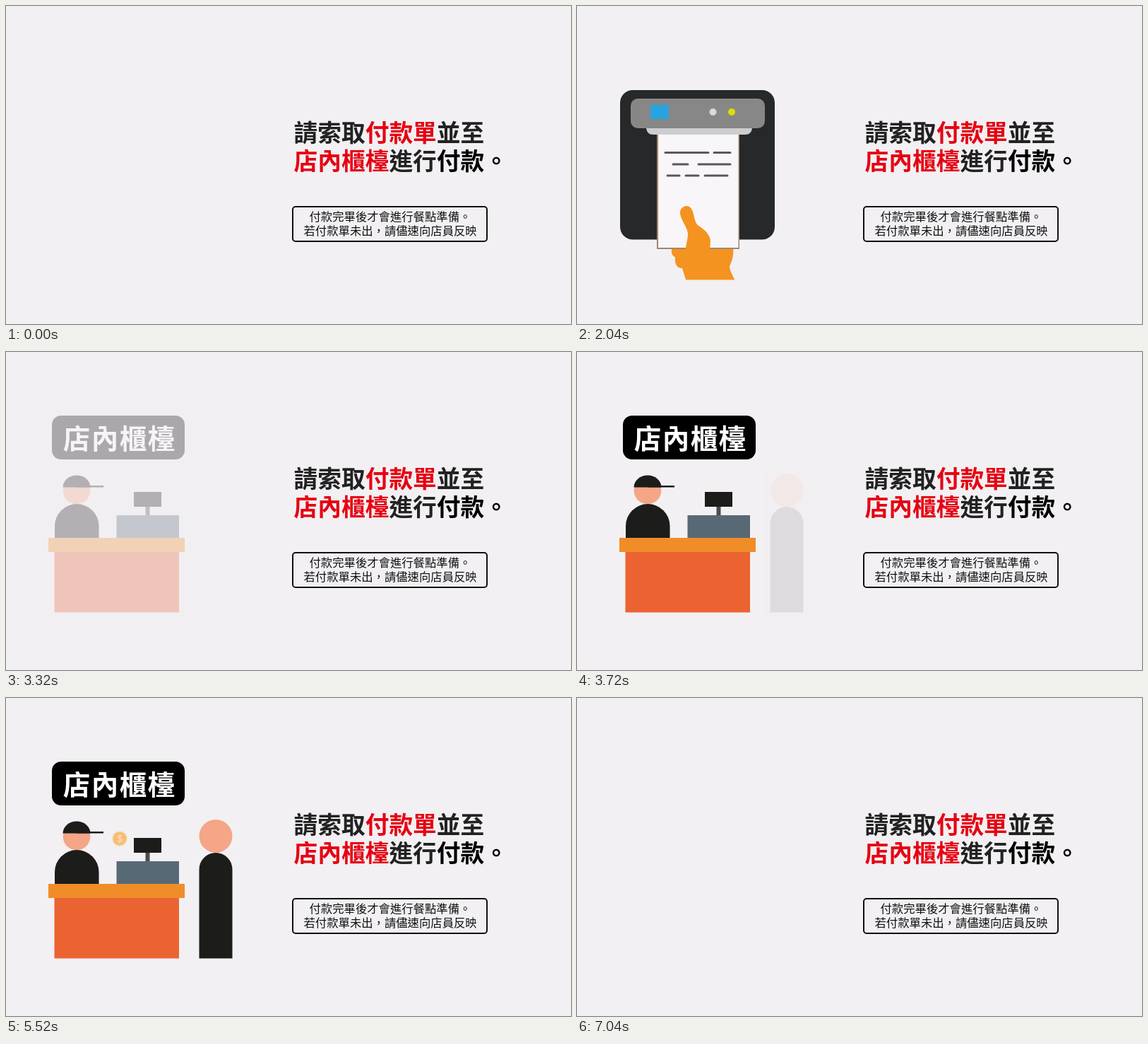
An HTML page with a canvas for the animation above (7.08 s loop, 800x450 px).

```html
<!DOCTYPE html>
<html lang="zh-Hant">
<head>
<meta charset="utf-8">
<title>付款說明</title>
<style>
  html, body { margin: 0; width: 100%; height: 100%; overflow: hidden; background: #f2f0f3; }
  canvas { display: block; width: 800px; height: 450px; }
</style>
</head>
<body>
<canvas id="stage" width="800" height="450"></canvas>
<script>
const ctx = document.getElementById('stage').getContext('2d');
const LOOP = 7080, STEP = 40;
const BG = '#f2f0f3', DARK = '#1c1c1b', INK = '#222222', RED = '#e60012', SKIN = '#f4a686', ORANGE = '#f4931f';
const FONT = '"Noto Sans CJK TC", "Noto Sans CJK", sans-serif';

const ramp = (t, a, b) => Math.min(1, Math.max(0, (t - a) / (b - a)));
const ease = p => p * p * (3 - 2 * p);

function rect(x, y, w, h, color) {
  ctx.fillStyle = color;
  ctx.fillRect(x, y, w, h);
}

function round(x, y, w, h, r, color) {
  ctx.beginPath();
  ctx.roundRect(x, y, w, h, r);
  ctx.fillStyle = color;
  ctx.fill();
}

function disc(x, y, r, color) {
  ctx.beginPath();
  ctx.arc(x, y, r, 0, 7);
  ctx.fillStyle = color;
  ctx.fill();
}

// Runs of [text, color], each glyph one em wide
function text(x, y, size, weight, gap, runs) {
  ctx.font = `${weight} ${size}px ${FONT}`;
  ctx.letterSpacing = gap + 'px';
  for (const [str, color] of runs) {
    ctx.fillStyle = color;
    ctx.fillText(str, x, y);
    x += str.length * (size + gap);
  }
  ctx.letterSpacing = '0px';
}

// Fades what is below by covering it with the background
function veil(x, y, w, h, shown) {
  if (shown >= 1) return;
  ctx.globalAlpha = 1 - shown;
  rect(x, y, w, h, BG);
  ctx.globalAlpha = 1;
}

function message() {
  text(407.6, 192, 33.7, 700, 0, [['請索取', INK], ['付款單', RED], ['並至', INK]]);
  text(407.6, 232, 33.7, 700, 0, [['店內櫃檯', RED], ['進行', INK], ['付款。', '#000']]);
  ctx.beginPath();
  ctx.roundRect(406, 284, 275, 49, 4);
  ctx.lineWidth = 2;
  ctx.strokeStyle = '#111';
  ctx.stroke();
  text(429.5, 304.3, 16.35, 400, 0, [['付款完畢後才會進行餐點準備。', '#111']]);
  text(421.5, 323.8, 16.35, 400, 0, [['若付款單未出，請儘速向店員反映', '#111']]);
}

const fingers = new Path2D('M136 338C132 346 134 354 139 355C138 366 142 371 149 371L154 387V390H224L223 387C220 380 216 374 216 368C221 358 222 350 221 340Z');
const thumb = new Path2D('M146 294C145 284 157 279 162 287C167 295 165 306 172 311C182 317 188 324 189 332L188 348H154C153 340 157 332 157 322C156 312 148 305 146 294Z');

function hand(path, dy) {
  ctx.save();
  ctx.translate(0, dy);
  ctx.fillStyle = ORANGE;
  ctx.fill(path);
  ctx.restore();
}

function paper(bottom) {
  const dy = bottom - 344;
  rect(113, 182 + dy, 117, 162, '#a08770');
  rect(115, 182 + dy, 113.5, 160, '#f8f6f8');
  ctx.strokeStyle = '#58585b';
  ctx.lineWidth = 3;
  ctx.lineCap = 'round';
  const rows = [[207.5, 125, 186, 194, 217], [224, 136, 157, 172, 217], [240, 128, 145, 154, 172, 181, 213]];
  ctx.beginPath();
  for (const [y, ...xs] of rows) {
    for (let i = 0; i < xs.length; i += 2) {
      ctx.moveTo(xs[i], y + dy);
      ctx.lineTo(xs[i + 1], y + dy);
    }
  }
  ctx.stroke();
}

function printer(t) {
  round(61, 119, 219, 211.5, 18, '#262829');
  const out = ease(ramp(t, 420, 1010));
  const rise = ease(ramp(t, 1080, 1500));
  const pull = ramp(t, 2200, 2800) ** 2 * 212;
  const reach = (1 - rise) * 112 + pull;

  ctx.save();
  ctx.beginPath();
  ctx.rect(50, 180, 240, 207.5);
  ctx.clip();
  hand(fingers, reach);
  if (out > 0) paper(182 + 162 * out + pull);
  hand(thumb, reach);
  ctx.restore();

  round(76, 131, 190, 42, 10, '#878787');
  ctx.fillStyle = '#cdcdd0';
  ctx.fill(new Path2D('M98 173H248C247 179 244 182 238 182H108C102 182 99 179 98 173Z'));
  rect(104, 140, 26, 20, '#27a4e0');
  disc(192.5, 150, 5, '#dadada');
  disc(219, 150, 5, '#dce000');
  veil(50, 110, 240, 285, t < 1000 ? ramp(t, 0, 400) : 1 - ramp(t, 2860, 3180));
}

function person(x, w, top, bottom) {
  round(x, top, w, bottom - top, [w / 2, w / 2, 0, 0], DARK);
}

function coin(t) {
  const [first, period, flight, count] = [4240, 680, 340, 3];
  const n = Math.floor((t - first) / period);
  if (n < 0 || n >= count) return;
  const local = t - first - n * period;
  const p = ease(ramp(local, 0, flight));
  const x = 262 - 101 * p;
  const y = 199 - 19 * Math.sin(Math.PI * p);
  ctx.globalAlpha = ramp(local, -40, 80) * (1 - ramp(local, 520, 680));
  disc(x, y, 11, '#f9d49a');
  disc(x, y, 9.6, '#f39a20');
  ctx.font = '700 14px Lato, sans-serif';
  ctx.textAlign = 'center';
  ctx.fillStyle = '#fff';
  ctx.fillText('$', x, y + 5);
  ctx.textAlign = 'left';
  ctx.globalAlpha = 1;
}

function counter(t) {
  round(65, 90, 188, 62, 13, '#000');
  text(80.8, 136.5, 38.5, 700, 1.5, [['店內櫃檯', '#fff']]);

  disc(100, 196, 19.3, SKIN);
  ctx.beginPath();
  ctx.ellipse(100, 191.5, 19.5, 17, 0, Math.PI, 0);
  ctx.fillStyle = DARK;
  ctx.fill();
  rect(100, 189, 38, 2.5, DARK);
  person(69, 62.5, 215, 264);

  rect(197.5, 218, 6, 14, '#4a4c4e');
  rect(181, 198, 39, 21, DARK);
  rect(156.5, 231, 88.5, 33, '#576975');
  rect(68.5, 282, 176.5, 86.5, '#eb6331');
  rect(60, 263, 193, 20, '#f08d29');

  disc(297, 195.5, 23.5, SKIN);
  person(273.5, 47, 219, 368.5);
  veil(265, 165, 64, 210, ramp(t, 3680, 4080));
  coin(t);
  veil(50, 80, 285, 300, ramp(t, 3200, 3600) * (1 - ramp(t, 6640, 7040)));
}

function frame(now) {
  const t = Math.floor(now % LOOP / STEP) * STEP;
  rect(0, 0, 800, 450, BG);
  if (t < 3200) printer(t);
  else counter(t);
  message();
}

const start = performance.now();
function tick() {
  frame(performance.now() - start);
  requestAnimationFrame(tick);
}
tick();
</script>
</body>
</html>
```
